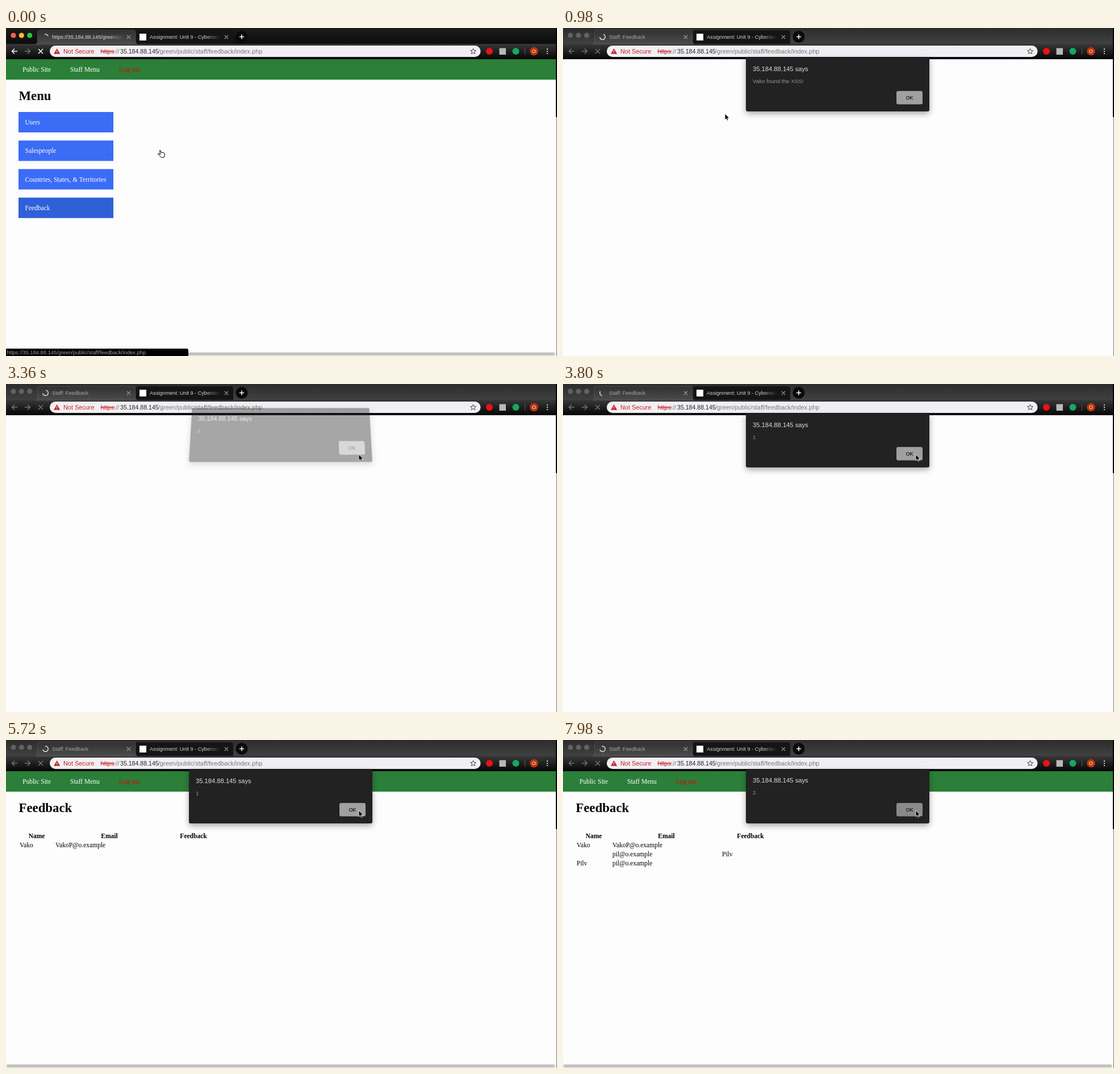
These frames come from a looping animation (970x578 px, 8 s). An HTML page:

```html
<!DOCTYPE html>
<html lang="en">
<head>
<meta charset="utf-8">
<title>Stacked alerts</title>
<style>
  html, body { margin: 0; width: 100%; height: 100%; overflow: hidden; background: #fdfdfd; }
  #stage { position: relative; width: 970px; height: 578px; overflow: hidden; }
  svg { position: absolute; left: 0; top: 0; overflow: visible; }
  text { font-family: "Liberation Sans", Arial, sans-serif; white-space: pre; }
  .page text { font: 11.5px "Liberation Serif", Times, serif; }
  .page .head { font-size: 22.8px; font-weight: bold; }
  .page .th { font-weight: bold; text-anchor: middle; }
  .line { fill: none; stroke-width: 1.5; }
  #dialog {
    position: absolute; left: 322px; top: 52px; width: 323px; height: 95px;
    background: #222; border-radius: 0 0 3px 3px; transform-origin: 50% 100%;
    box-shadow: 0 4px 11px rgba(0, 0, 0, .35);
  }
</style>
</head>
<body>
<div id="stage">
  <svg width="970" height="578">
    <defs>
      <linearGradient id="bar" x2="0" y2="1"><stop stop-color="#383838"/><stop offset="1" stop-color="#050505"/></linearGradient>
      <linearGradient id="stripOn" x2="0" y2="1"><stop stop-color="#1c1c1c"/><stop offset="1" stop-color="#0c0c0c"/></linearGradient>
      <linearGradient id="stripOff" x2="0" y2="1"><stop stop-color="#2c2c2c"/><stop offset="1" stop-color="#404040"/></linearGradient>
      <linearGradient id="tab" x2="0" y2="1"><stop stop-color="#303030"/><stop offset="1" stop-color="#4c4c4c"/></linearGradient>
      <linearGradient id="fadeOut"><stop offset=".8" stop-color="#fff"/><stop offset="1" stop-color="#000"/></linearGradient>
      <mask id="tabFade" maskUnits="userSpaceOnUse" x="80" y="5" width="128" height="22"><rect x="80" y="5" width="128" height="22" fill="url(#fadeOut)"/></mask>
      <mask id="tabFade2" maskUnits="userSpaceOnUse" x="250" y="5" width="128" height="22"><rect x="250" y="5" width="128" height="22" fill="url(#fadeOut)"/></mask>
    </defs>

    <g class="page">
      <g id="nav">
        <rect y="54" width="970" height="37" fill="#2b7f39"/>
        <g fill="#fff"><text x="29" y="77">Public Site</text><text x="113" y="77">Staff Menu</text></g>
        <text x="199" y="77" fill="#e60000">Log out</text>
        <path d="M0 570H970V578H0Z" fill="#f1f1f1"/>
        <rect x="1" y="572" width="965" height="5" rx="2.5" fill="#c1c1c1"/>
      </g>
      <g id="menu"><text class="head" x="22.5" y="127">Menu</text></g>
      <g id="feedback">
        <text class="head" x="22.5" y="127">Feedback</text>
        <text class="th" x="54" y="173">Name</text>
        <text class="th" x="182" y="173">Email</text>
        <text class="th" x="330" y="173">Feedback</text>
        <text x="24" y="189">Vako</text><text x="87" y="189">VakoP@o.example</text>
        <g id="moreRows">
          <text x="87" y="205">pil@o.example</text><text x="280" y="205">Pilv</text>
          <text x="24" y="221">Pilv</text><text x="87" y="221">pil@o.example</text>
        </g>
      </g>
    </g>

    <g id="status">
      <path d="M0 565H318Q321 565 321 568V578H0Z"/>
      <text x="1.5" y="575" font-size="9.34" fill="#a0a0a0">https://35.184.88.145/green/public/staff/feedback/index.php</text>
    </g>

    <rect id="strip" width="970" height="28"/>
    <rect y="28" width="970" height="27" fill="url(#bar)"/>
    <path d="M228 28V8Q228 4 232 4H396Q400 4 400 8V28Z" fill="#151515"/>
    <path d="M52 28.5Q55.500 28 55.500 24V8Q55.500 4 59.500 4H224Q228 4 228 8V24Q228 28 231 28.500Z" fill="url(#tab)" stroke="#606060" stroke-width=".6"/>
    <g id="lights"><circle cx="13" cy="13" r="4.600"/><circle cx="27.300" cy="13" r="4.600"/><circle cx="41.700" cy="13" r="4.600"/></g>
    <circle id="spinner" class="line" r="4.700" pathLength="360" stroke="#e4e4e4"/>
    <g mask="url(#tabFade)"><text id="tabTitle" x="81" y="19" font-size="9.2"></text></g>
    <rect x="235" y="10" width="12" height="12" fill="#fff"/>
    <g mask="url(#tabFade2)"><text x="253" y="19" font-size="9.15" fill="#d2d2d2">Assignment: Unit 9 - Cybersecurity</text></g>
    <path class="line" d="M213 13L219 19M219 13L213 19M385 13L391 19M391 13L385 19" stroke="#a5a5a5" style="stroke-width:1.1"/>
    <circle cx="415" cy="15.500" r="10.500" fill="#0a0a0a"/>
    <path class="line" d="M411 15.500H419M415 11.500V19.500" stroke="#fff"/>

    <path id="back" class="line" d="M20 41H10.500M15 36.500L10.500 41L15 45.500"/>
    <path class="line" d="M33 41H42.500M38 36.500L42.500 41L38 45.500" stroke="#737373"/>
    <path id="stop" class="line" d="M57 37L65 45M65 37L57 45"/>
    <rect x="77" y="31" width="758.500" height="20" rx="10" fill="#f2eff4"/>
    <path d="M89.700 36L95.200 45.800H84.200Z" fill="#c5221f"/>
    <path d="M89.700 39.500V42.500M89.700 43.500V44.700" stroke="#fff"/>
    <g font-size="10.9">
      <text x="101" y="45" fill="#c5221f">Not Secure</text>
      <text x="166.500" y="45" fill="#c5221f">https<tspan fill="#777">://</tspan></text>
      <text x="201" y="45" fill="#222" font-size="10.6">35.184.88.145</text>
      <text x="268" y="45" fill="#777">/green/public/staff/feedback/index.php</text>
    </g>
    <path d="M166.500 41.500H191" stroke="#c5221f"/>
    <path id="star" fill="none" stroke="#444"/>
    <circle cx="851" cy="41" r="6" fill="#e8111b"/>
    <rect x="868.500" y="35.500" width="11.500" height="11.500" fill="#b9b9b9"/>
    <circle cx="897.500" cy="41" r="6" fill="#16a765"/>
    <path d="M913.500 35V47" stroke="#555"/>
    <circle cx="929.500" cy="41" r="7.300" fill="#bf360c"/>
    <text x="929.500" y="44.200" font-size="9" fill="#fff" text-anchor="middle">O</text>
    <path d="M953 37V37.100M953 41V41.100M953 45V45.100" stroke="#eee" stroke-width="2.200" stroke-linecap="round"/>
    <path d="M969 0V157" stroke="#000" stroke-width="2"/>
    <path d="M969.500 157V578" stroke="#777"/>
  </svg>

  <div id="dialog">
    <svg width="323" height="95">
      <text x="12" y="23.500" font-size="11.200" fill="#dedede">35.184.88.145 says</text>
      <text id="message" x="12" y="44.500" font-size="9.700" fill="#979797"></text>
      <rect id="ok" x="265" y="59" width="46" height="23.500" rx="3"/>
      <text x="288" y="74" font-size="8.800" fill="#1c1c1c" stroke="#1c1c1c" stroke-width=".25" text-anchor="middle">OK</text>
    </svg>
  </div>

  <svg width="970" height="578">
    <g id="cursor" stroke-linejoin="round">
      <path id="arrow" d="M0 0V11L2.500 8.700L4.100 12.300L6 11.500L4.400 8H7.800Z" fill="#000" stroke="#fff" stroke-width=".8"/>
      <path id="hand" d="M-.500 1Q0-.800 1.200 1L2.200 4.500L5 4.300L7 5L8.300 6V9L7.200 13H2.200L-1.500 9.200L-3.500 7Q-3.500 5.800-2 6.300L.600 8Z" fill="#fff" stroke="#000"/>
    </g>
  </svg>
</div>

<script>
const $ = id => document.getElementById(id);
const set = (id, attrs) => { for (const k in attrs) $(id).setAttribute(k, attrs[k]); };
const show = (id, on) => { $(id).style.display = on ? '' : 'none'; };
const clamp = v => Math.max(0, Math.min(1, v));
const smooth = v => { v = clamp(v); return v * v * (3 - 2 * v); };

const LOOP = 8000;
const PAGE_URL = 'https://35.184.88.145/green/public/staff/feedback/index.php';
const BLANK = 8, INACTIVE = 11, FIRST_ROW = 107, ALL_ROWS = 143;
// Times are in steps; each alert opens in 5 steps and closes in 3.
const ALERTS = [
  { open: 11.4, close: 67, text: 'Vako found the XSS!' },
  { open: 70, close: 104, text: '1' },
  { open: 107.25, close: 139, text: '1' },
  { open: 142.55, close: 172, text: '2' },
];
const CURSOR = [[0, 271, 215], [14, 266, 155], [18, 268, 152], [40, 604.5, 131.5], [50, 621, 124]];

// Static parts built by rule
['Users', 'Salespeople', 'Countries, States, & Territories', 'Feedback'].forEach((label, i) => {
  const y = 148 + i * 50.3;
  $('menu').insertAdjacentHTML('beforeend',
    `<rect x="22" y="${y}" width="167" height="36" fill="${i < 3 ? '#3b6cf6' : '#2f60d8'}"/>
     <text x="33.500" y="${y + 22}" fill="#fff">${label.replace('&', '&amp;')}</text>`);
});
set('star', { d: 'M' + Array.from({ length: 10 }, (_, i) => {
  const a = i * Math.PI / 5, r = i % 2 ? 2.3 : 5.2;
  return `${822.5 + r * Math.sin(a)} ${41.3 - r * Math.cos(a)}`;
}).join('L') + 'Z' });

// Steps last 20, 100 and 20 ms in turn.
function stepAt(t) {
  const r = t % 140;
  return Math.floor(t / 140) * 3 + (r < 20 ? 0 : r < 120 ? 1 : 2);
}

function drawSpinner(n) {
  const phase = (((n - 146) / 52) % 1 + 1) % 1 * 2;
  const grow = smooth(phase), shrink = smooth(phase - 1);
  const start = 255 + 360 * shrink;
  const sweep = Math.max(14, 255 + 270 * grow + 90 * shrink - start);
  set('spinner', { transform: `translate(69.5 15.700) rotate(${start})`, 'stroke-dasharray': `${sweep} 360` });
}

function drawCursor(n) {
  let [, x, y] = CURSOR[CURSOR.length - 1];
  const i = CURSOR.findIndex(k => k[0] > n);
  if (i > 0) {
    const [n0, x0, y0] = CURSOR[i - 1], [n1, x1, y1] = CURSOR[i];
    const p = smooth((n - n0) / (n1 - n0));
    x = x0 + (x1 - x0) * p;
    y = y0 + (y1 - y0) * p;
  }
  set('cursor', { transform: `translate(${x} ${y})` });
  show('hand', n < BLANK);
  show('arrow', n >= BLANK);
}

function drawDialog(n) {
  const alert = ALERTS.find(a => n >= a.open && n < a.close + 3);
  show('dialog', alert);
  if (!alert) return;
  const shown = clamp(Math.min((n - alert.open) / 5, (alert.close + 3 - n) / 3));
  const hidden = 1 - shown, lean = .06 * hidden;
  const style = $('dialog').style;
  style.opacity = shown;
  style.transform = `translateY(${-16 * hidden}px) ` +
    `matrix3d(1,0,0,0, 0,${1 + lean},0,${-lean / 95}, 0,0,1,0, 0,0,0,1)`;
  $('message').textContent = alert.text;
  set('ok', { fill: n >= alert.close - 4 ? '#8a8a8a' : '#a0a0a0' });
}

function draw(n) {
  const active = n < INACTIVE, loaded = n >= FIRST_ROW;
  show('nav', n < BLANK || loaded);
  show('menu', n < BLANK);
  show('feedback', loaded);
  show('moreRows', n >= ALL_ROWS);
  set('status', { opacity: clamp((19 - n) / 11) });

  set('strip', { fill: active ? 'url(#stripOn)' : 'url(#stripOff)' });
  ['#ff5f57', '#febc2e', '#28c840'].forEach((color, i) =>
    $('lights').children[i].setAttribute('fill', active ? color : '#626262'));
  set('back', { stroke: active ? '#fff' : '#737373' });
  set('stop', { stroke: active ? '#fff' : '#737373' });
  set('tabTitle', { fill: active ? '#dadada' : '#a6a6a6' });
  $('tabTitle').textContent = n < BLANK ? PAGE_URL : 'Staff: Feedback';

  drawSpinner(n);
  drawDialog(n);
  drawCursor(n);
}

const began = performance.now();
function tick() {
  draw(stepAt((performance.now() - began) % LOOP));
  requestAnimationFrame(tick);
}
tick();
</script>
</body>
</html>
```
